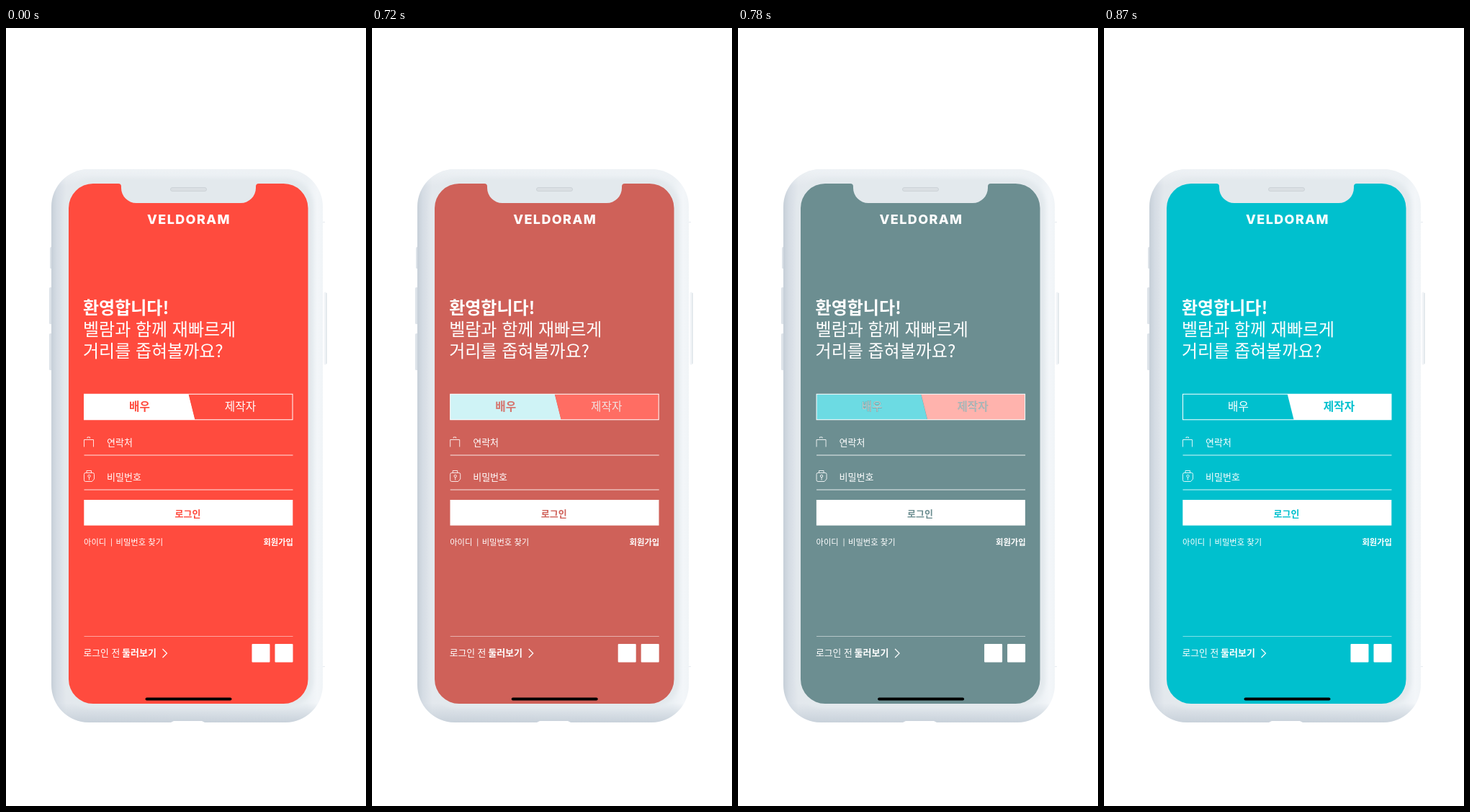
Recreate the animation shown at these times as an HTML page. Size 500x1080 px, loop 2400 ms.

```html
<!DOCTYPE html>
<html lang="ko">
<head>
<meta charset="utf-8">
<title>Login theme switch</title>
<style>
  html, body { margin: 0; width: 100%; height: 100%; overflow: hidden; background: #fff; }
  svg { display: block; width: 500px; height: 1080px; }
  text { font-family: "Noto Sans CJK KR", "Noto Sans CJK", "Noto Sans KR", sans-serif; font-weight: 350; white-space: pre; }
  .bold { font-weight: 700; }
  .mid { text-anchor: middle; }
  .end { text-anchor: end; }
  .title { font-size: 24px; }
  .tab { font-size: 15.7px; }
  .field { font-size: 13px; }
  .small { font-size: 11.3px; }
  .brand { font: 800 18px Inter, sans-serif; letter-spacing: 1.4px; }
  .line { fill: none; stroke: #fff; }
  .theme { fill: var(--theme); }
</style>
</head>
<body>
<svg viewBox="0 0 500 1080" xmlns="http://www.w3.org/2000/svg">
  <defs>
    <linearGradient id="side">
      <stop offset="0" stop-color="#c6cfd8"/>
      <stop offset=".02" stop-color="#d5dce4"/>
      <stop offset=".055" stop-color="#e3e8ed"/>
      <stop offset=".94" stop-color="#ebf0f4"/>
      <stop offset=".98" stop-color="#f3f6f9"/>
      <stop offset="1" stop-color="#f0f4f7"/>
    </linearGradient>
    <linearGradient id="base" x2="0" y2="1">
      <stop offset="0" stop-color="#eef2f5"/>
      <stop offset=".03" stop-color="#eef2f5" stop-opacity="0"/>
      <stop offset=".965" stop-color="#c8d1da" stop-opacity="0"/>
      <stop offset="1" stop-color="#c8d1da"/>
    </linearGradient>
    <filter id="soft"><feGaussianBlur stdDeviation="2.500"/></filter>
  </defs>

  <g id="phone">
    <g fill="#dde3e9">
      <rect x="61" y="304" width="5" height="30" rx="1.5"/>
      <rect x="60" y="360" width="6" height="51" rx="1.5"/>
      <rect x="60" y="424" width="6" height="51" rx="1.5"/>
    </g>
    <rect x="441.500" y="366.500" width="4" height="101" rx="1.5" fill="#f2f5f8"/>
    <path d="M445 368V466" stroke="#d3dae1"/>
    <path d="M438 269.5h5M438 886.5h5" stroke="#e6ebf0"/>
    <rect x="63" y="196" width="377" height="768" rx="52" fill="url(#side)"/>
    <rect x="63" y="196" width="377" height="768" rx="52" fill="url(#base)"/>
    <rect x="81" y="208" width="346" height="736" rx="39" fill="#e3e9ed" filter="url(#soft)"/>
    <path d="M229 964l4-2h39l4 2z" fill="#fff"/>
    <rect x="228.500" y="221.500" width="50" height="5" rx="2.500" fill="#dadfe3" stroke="#cdd3d8"/>
  </g>

  <path class="theme" d="M87 250a34 34 0 0 1 34-34H156q4 0 4 4v2a21 21 0 0 0 21 21H326a21 21 0 0 0 21-21v-2q0-4 4-4H385.500a34 34 0 0 1 34 34V904a34 34 0 0 1-34 34H121a34 34 0 0 1-34-34z"/>

  <g id="content" fill="#fff">
    <text class="brand" x="196" y="272">VELDORAM</text>

    <text class="title bold" x="107" y="397">환영합니다!</text>
    <text class="title" x="107" y="427">벨람과 함께 재빠르게</text>
    <text class="title" x="107" y="457">거리를 좁혀볼까요?</text>

    <path id="left" d="M108.500 508H253.500L262.500 544H108.500z"/>
    <path id="right" d="M253.700 508H398V544H262.700z"/>
    <rect class="line" x="108.500" y="508.250" width="289.500" height="35.500"/>
    <g class="tab mid">
      <text class="theme bold" x="185.500" y="531">배우</text>
      <text x="325.500" y="531">제작자</text>
      <g id="active">
        <text x="185.500" y="531">배우</text>
        <text class="theme bold" x="325.500" y="531">제작자</text>
      </g>
    </g>

    <g class="line" stroke-opacity=".85">
      <path d="M108.500 581.500V571.500H121.500V581.500M113 569.500V568h3.500v1.500"/>
      <path d="M110.500 617.500H120.500q2 0 2 2V626l-3 3.500H110.500q-2 0-2-2V619.500q0-2 2-2zM112 617v-2.500h6.500V617"/>
      <circle cx="115.500" cy="622" r="1.700"/>
      <path d="M115.500 624v3.500"/>
      <path d="M108.500 593H398.500M108.500 641H398.500"/>
      <path d="M108.500 844.500H398.500" stroke-opacity=".5"/>
    </g>
    <text class="field" x="140" y="580">연락처</text>
    <text class="field" x="140" y="628">비밀번호</text>

    <rect x="108.300" y="655" width="290" height="35.600"/>
    <text class="field theme bold mid" x="252.500" y="679">로그인</text>

    <text class="small" x="108" y="718">아이디</text>
    <path class="line" d="M146.500 708.500V719.500" stroke-opacity=".8"/>
    <text class="small" x="152.500" y="718">비밀번호 찾기</text>
    <text class="small bold end" x="399" y="718">회원가입</text>

    <text class="field" x="107.500" y="872" style="font-size:12.8px">로그인 전</text>
    <text class="field bold" x="161" y="872">둘러보기</text>
    <path class="line" d="M217.500 862l6 6-6 6" stroke-width="1.200"/>
    <rect x="341.500" y="855" width="25" height="25.500" rx="1"/>
    <rect x="373.500" y="855" width="25" height="25.500" rx="1"/>
    <rect x="193.500" y="929.500" width="120" height="4" rx="2" fill="#000"/>
  </g>
</svg>
<script>
  const LOOP = 2400, START = 660, STEP = 30;
  const fade = [0, 0.02, 0.08, 0.19, 0.37, 0.576, 0.79, 0.94, 1];
  const RED = [255, 75, 62], TEAL = [0, 192, 206], WHITE = [255, 255, 255];

  const $ = selector => document.querySelector(selector);
  const root = document.documentElement;
  const content = $('#content'), left = $('#left'), right = $('#right');
  const active = $('#active');

  const mix = (a, b, p) => `rgb(${a.map((v, i) => Math.round(v + (b[i] - v) * p))})`;

  function draw(time) {
    const step = Math.floor((time % LOOP - START) / STEP) + 1;
    const p = fade[Math.max(0, Math.min(step, fade.length - 1))];
    root.style.setProperty('--theme', mix(RED, TEAL, p));
    left.setAttribute('fill', mix(WHITE, TEAL, p));
    right.setAttribute('fill', mix(RED, WHITE, p));
    // The old labels sink into their own background as the new ones fade in.
    active.setAttribute('opacity', p);
    content.setAttribute('transform', `translate(${p} 0)`);
  }

  function tick() {
    draw(performance.now());
    requestAnimationFrame(tick);
  }
  tick();
</script>
</body>
</html>
```
